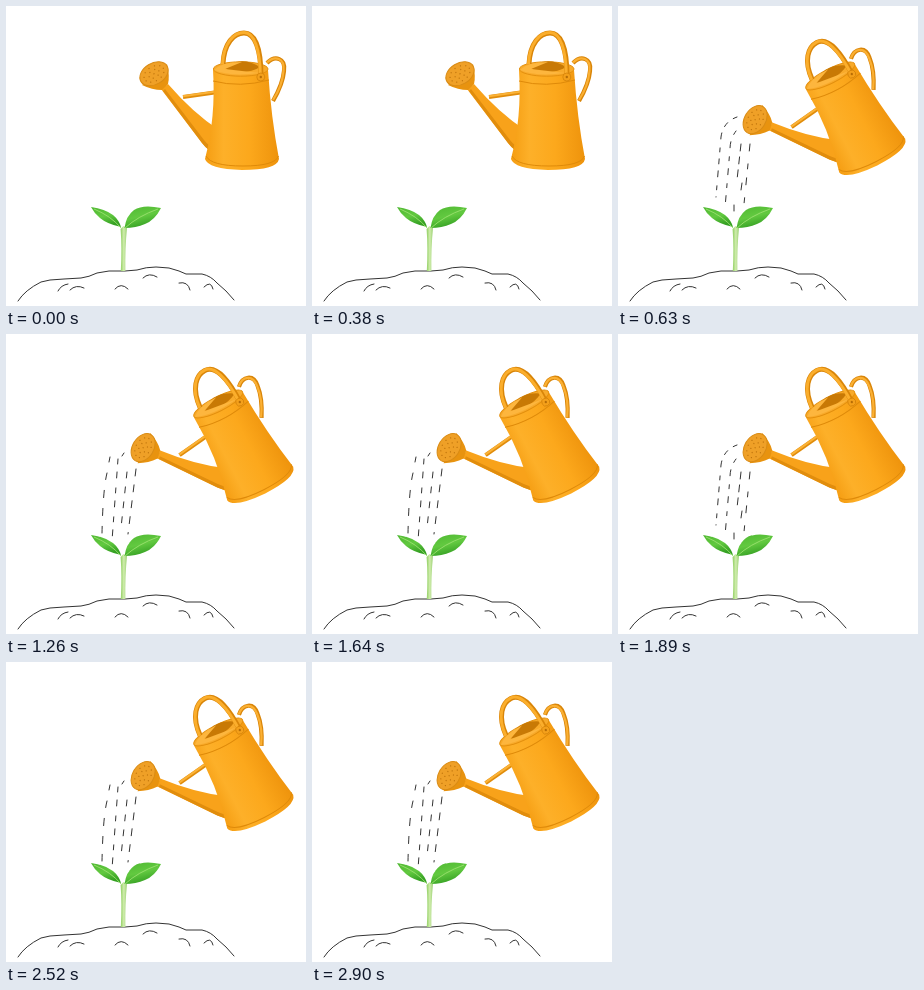
Write an HTML page that moves like this. It is 300x300 px and loops after 3.15 s.

```html
<!DOCTYPE html>
<html lang="en">
<head>
<meta charset="utf-8">
<title>Watering a seedling</title>
<style>
html, body { margin: 0; width: 100%; height: 100%; overflow: hidden; background: #fff; }
svg { display: block; width: 100vw; height: 100vh; }
.line { fill: none; stroke: #333; stroke-width: 1; stroke-linecap: round; stroke-linejoin: round; }
</style>
</head>
<body>
<svg viewBox="0 0 300 300">
  <defs>
    <linearGradient id="metal">
      <stop offset="0" stop-color="#f59d12"/>
      <stop offset=".25" stop-color="#fdb029"/>
      <stop offset=".6" stop-color="#fca81c"/>
      <stop offset="1" stop-color="#ee930c"/>
    </linearGradient>
    <linearGradient id="leaf" x1="0" y1="0" x2=".4" y2="1">
      <stop offset="0" stop-color="#4fb832"/>
      <stop offset=".55" stop-color="#62c940"/>
      <stop offset="1" stop-color="#35a023"/>
    </linearGradient>
    <linearGradient id="stalk">
      <stop offset="0" stop-color="#8fcf60"/>
      <stop offset=".5" stop-color="#d0ecad"/>
      <stop offset="1" stop-color="#9bd273"/>
    </linearGradient>
  </defs>

  <g id="soil" class="line">
    <path d="M12 295Q19 284 35 276L44 274 58 273 75 272Q83 271 91 267L103 265 119 265 131 264Q140 261 150 261L163 262 173 265 180 268 196 268Q205 270 211 277L220 285 228 294"/>
    <path d="M52 285Q55 279 62 278M64 284Q70 278 78 282M109 283Q115 276 122 283M137 272Q143 266 151 271M173 277Q182 275 184 284M198 281Q205 274 207 283"/>
  </g>

  <g id="seedling">
    <path d="M114.8 265Q116 242 114.6 223L117.5 220 121 222Q119 242 119.4 265Z" fill="url(#stalk)"/>
    <path d="M85 201Q99 203 107 209 113 214 115 221 101 218 94 212 88 207 85 201Z" fill="url(#leaf)"/>
    <path d="M118.5 222Q120 210 128 204 137 198 155 202 149 214 139 218 130 222 118.5 222Z" fill="url(#leaf)"/>
    <path d="M88 203Q105 210 115 222M119 222Q132 210 152 203" fill="none" stroke="#9be070" stroke-width=".9"/>
  </g>

  <g id="can">
    <path d="M261 57C269 49 280 52 278 65 277 77 271 88 267 95" fill="none" stroke="#d98508" stroke-width="4.2"/>
    <path d="M261 56.5C269 49 279 52 277.5 65 276.5 77 271 88 267 94" fill="none" stroke="#fbb033" stroke-width="2.2"/>
    <path d="M177 91L212 86" stroke="#e08c0b" stroke-width="4"/>
    <path d="M177 90.3L212 85.2" stroke="#fbb236" stroke-width="2"/>
    <path d="M155 83L162 78 Q187 107 213 124L211 148Q202 145 196 137Z" fill="#f8a21a"/>
    <path d="M157 85L196 137Q202 145 211 148L212 144Q203 141 198 134L159 83Z" fill="#e18d0d"/>
    <path d="M136 79Q146 84 156 84L162 78Q164 70 161 58Z" fill="#e8930f"/>
    <ellipse cx="148" cy="67.8" rx="15.2" ry="10.6" transform="rotate(-31 148 67.8)" fill="#efa027" stroke="#d98b14"/>
    <g id="holes" fill="#bd720b" transform="translate(148 67.8) rotate(-31)"></g>
    <path d="M207 64L262 64Q265 111 273 153 271 164 236 164 202 163 199 153 210 111 207 64Z" fill="url(#metal)"/>
    <path d="M200 150Q205 160 237 160 269 160 272.5 150M207 75Q234 82 263 74" fill="none" stroke="#df8a09" stroke-width="1"/>
    <ellipse cx="234.7" cy="63" rx="27.3" ry="7.2" fill="#f8aa2a" stroke="#e4900e"/>
    <path d="M219 62Q235 49 254 61 247 66 234 66 223 66 219 62Z" fill="#c87905"/>
    <path d="M208 64Q216 56 236 56L219 63 253 67Q224 71 208 64Z" fill="#fdb63e"/>
    <path d="M217 58C218 37 228 27 238 27 249 27 255 43 255 71" fill="none" stroke="#d98508" stroke-width="5"/>
    <path d="M216.5 58C217.5 37 228 26.5 238 26.5 248 26.5 254.3 43 254.3 71" fill="none" stroke="#fbae2c" stroke-width="3"/>
    <circle cx="254.8" cy="71" r="4" fill="#f4a01b" stroke="#d58309" stroke-width=".8"/>
    <circle cx="254.8" cy="71" r="1.2" fill="#b76d05"/>
  </g>

  <g id="rainA" class="line">
    <path d="M119 111Q105 116 103 131L98 191" stroke-dasharray="4 7 5 7 6 9"/>
    <path d="M118 125Q112 133 112 143L107 202" stroke-dasharray="4 8 6 9"/>
    <path d="M123 138L119 174M124 177L123 184M116 199L116 205" stroke-dasharray="7 6"/>
    <path d="M132 138L126 198" stroke-dasharray="7 13 5 9"/>
  </g>
  <g id="rainB" class="line">
    <path d="M104 123L103 128M101 139Q97 155 96 199" stroke-dasharray="7 11"/>
    <path d="M118 119L116 122M112 125L106 207" stroke-dasharray="5 8 6 10"/>
    <path d="M121 138L115 194" stroke-dasharray="6 9"/>
    <path d="M130 135L122 200" stroke-dasharray="7 9"/>
  </g>
</svg>
<script>
const STEP = 630, STEPS = 5;
const el = id => document.getElementById(id);
const can = el('can'), rainA = el('rainA'), rainB = el('rainB');

// Rings of holes on the sprinkler face
let dots = '';
[[0, 1], [.38, 6], [.72, 11]].forEach(([r, n]) => {
  for (let i = 0; i < n; i++) {
    const a = i / n * Math.PI * 2;
    dots += `<circle cx="${15 * r * Math.cos(a)}" cy="${10 * r * Math.sin(a)}" r=".65"/>`;
  }
});
el('holes').innerHTML = dots;

const show = (node, on) => node.setAttribute('visibility', on ? 'visible' : 'hidden');

function draw(ms) {
  const step = Math.floor(ms / STEP) % STEPS;
  can.setAttribute('transform', step ? 'translate(256.5 153) rotate(-27) translate(-236.5 -157)' : '');
  show(rainA, step % 2 === 1);
  show(rainB, step > 0 && step % 2 === 0);
}

const start = performance.now();
function tick() {
  draw(performance.now() - start);
  requestAnimationFrame(tick);
}
tick();
</script>
</body>
</html>
```
